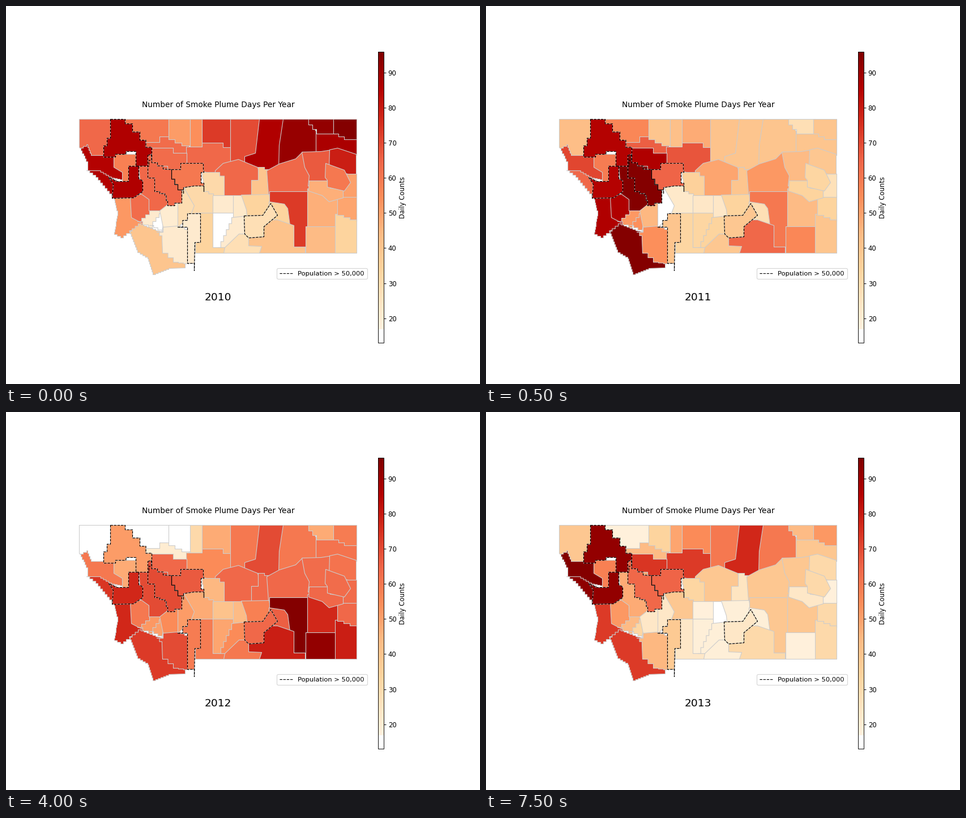
A matplotlib script for the animation above (8000 ms loop, 837 by 669 pixels).

```python
import numpy as np
import matplotlib.pyplot as plt
from matplotlib.animation import FuncAnimation
from matplotlib.cm import ScalarMappable
from matplotlib.colors import ListedColormap, Normalize
from matplotlib.lines import Line2D
from matplotlib.patches import Polygon

W, H, DPI = 837, 669, 83.7
FIRST_YEAR = 2010
STEP_MS, STEPS, STEPS_PER_YEAR = 500, 16, 7

plt.rcParams["font.family"] = "DejaVu Sans"

shades = plt.get_cmap("OrRd")(np.linspace(0, 1, 256))
shades[:12] = 1
cmap = ListedColormap(shades)
norm = Normalize(13, 96)

fig = plt.figure(figsize=((W + 0.01) / DPI, (H + 0.01) / DPI), dpi=DPI, facecolor="white")
ax = fig.add_axes([0, 0, 1, 1])
ax.set_xlim(-0.5, W - 0.5)
ax.set_ylim(H - 0.5, -0.5)
ax.axis("off")

counties = []


def stairs(a, b, step):
    """Points from a to b along steps; the path is the same in both directions."""
    if a[0] > b[0]:
        return stairs(b, a, step)[::-1]
    (x0, y0), (x1, y1) = a, b
    dx, dy = x1 - x0, y1 - y0
    if min(dx, abs(dy)) < 4:
        return [a, b]
    n = max(1, round(max(dx, abs(dy)) / step))
    path = [a]
    for k in range(n):
        x = x0 + dx * (k + 1) / n
        path += [(x, y0 + dy * k / n), (x, y0 + dy * (k + 1) / n)]
    return path


def county(days, *points, step=0, populous=False):
    """Add one county; later ones lie on top and define the shared border."""
    if step:
        ends = zip(points, points[1:] + points[:1])
        points = [p for a, b in ends for p in stairs(a, b, step)[:-1]]
    patch = Polygon(points, ec="0.8", lw=0.95, joinstyle="round",
                    zorder=2 + len(counties) * 0.01)
    ax.add_patch(patch)
    counties.append((patch, days))
    if populous:
        ax.add_patch(Polygon(points, fill=False, ec="black", lw=1, ls="--", zorder=5))


def box(days, left, top, right, bottom):
    county(days, (left, top), (right, top), (right, bottom), (left, bottom))


# North
county((64, 43, 13, 39), (129, 200), (190, 200), (190, 265), (150, 265), (129, 250))
box((60, 56, 13, 18), 205, 200, 288, 243)
county((63, 66, 21, 44), (238, 241), (270, 241), (270, 231), (322, 231), (322, 262),
       (238, 262))
county((51, 40, 13, 34), (286, 200), (324, 200), (324, 247), (309, 247), (286, 236),
       step=12)
box((54, 42, 31, 49), 324, 200, 349, 250)
box((73, 48, 48, 55), 345, 200, 398, 254)
county((64, 68, 55, 73), (318, 249), (346, 249), (346, 242), (383, 242), (383, 250),
       (399, 250), (399, 278), (372, 297), (330, 290), (319, 290))
county((63, 86, 64, 74), (243, 251), (287, 251), (294, 260), (318, 260), (318, 290),
       (252, 290), step=12)
box((70, 41, 60, 60), 395, 200, 451, 280)
county((86, 40, 70, 77), (447, 200), (493, 200), (485, 285), (460, 292), (421, 278),
       (421, 266), (440, 260))
county((91, 40, 60, 60), (489, 200), (537, 200), (550, 228), (550, 262), (515, 275),
       (481, 285), (482, 246))
box((87, 40, 61, 39), 546, 222, 618, 264)
county((92, 28, 48, 44), (533, 200), (581, 200), (581, 226), (547, 226), (533, 210),
       step=8)
county((95, 40, 59, 52), (577, 200), (618, 200), (618, 236), (596, 236), (577, 226),
       step=10)

# Centre
box((31, 23, 48, 39), 314, 316, 368, 370)
county((64, 49, 64, 39), (369, 291), (383, 278), (410, 271), (444, 285), (448, 300),
       (436, 340), (369, 340))
county((31, 35, 45, 33), (345, 294), (369, 294), (385, 307), (385, 338), (366, 336),
       (349, 328), step=10)
county((40, 40, 64, 25), (444, 285), (466, 292), (466, 337), (432, 337), (432, 308),
       (444, 302), step=12)
county((64, 52, 64, 39), (460, 291), (482, 279), (511, 270), (522, 259), (535, 264),
       (540, 333), (463, 333))
box((22, 24, 41, 18), 364, 335, 404, 370)
box((34, 33, 59, 24), 333, 366, 388, 437)
box((14, 33, 49, 19), 364, 366, 404, 427)
box((23, 24, 44, 14), 400, 335, 430, 374)
county((34, 34, 58, 19), (415, 334), (464, 333), (472, 375), (425, 371), (424, 360))
county((22, 34, 55, 19), (398, 374), (424, 371), (426, 406), (390, 427), (374, 427),
       step=10)
county((28, 39, 60, 19), (384, 437), (386, 427), (411, 403), (432, 403), (455, 428),
       (452, 437))

# East
box((73, 60, 95, 39), 464, 328, 538, 426)
county((34, 28, 66, 19), (464, 346), (491, 350), (497, 358), (501, 388), (464, 388))
county((41, 64, 79, 31), (428, 408), (445, 378), (479, 378), (508, 388), (508, 426),
       (528, 426), (528, 437), (447, 437), (451, 425), (428, 424))
box((47, 44, 77, 39), 531, 323, 590, 395)
box((44, 56, 92, 18), 528, 390, 584, 437)
box((34, 40, 79, 31), 580, 368, 618, 437)
county((49, 34, 64, 31), (584, 335), (618, 335), (618, 381), (584, 370), step=10)
county((67, 44, 63, 39), (522, 258), (556, 257), (575, 254), (575, 315), (533, 318),
       (535, 300), (527, 285))
county((79, 39, 61, 31), (571, 254), (585, 251), (618, 262), (618, 300), (570, 290))
box((50, 27, 63, 18), 593, 297, 618, 338)
county((47, 34, 64, 24), (535, 309), (572, 309), (572, 322), (595, 324), (595, 339),
       (570, 346), (558, 335), (534, 327))
county((60, 33, 63, 31), (564, 278), (597, 290), (608, 312), (597, 327), (567, 320),
       (567, 308), (563, 303))

# South-west
county((52, 86, 77, 73), (189, 338), (228, 338), (228, 372), (240, 385), (217, 397),
       (201, 410), (190, 404), (196, 366), step=5)
county((63, 86, 60, 52), (219, 338), (245, 330), (256, 340), (256, 366), (240, 384),
       (221, 374))
county((64, 95, 70, 48), (234, 283), (285, 283), (285, 353), (272, 362), (252, 362),
       (252, 342), (238, 332))
county((22, 52, 52, 44), (231, 381), (252, 362), (272, 362), (264, 385), (250, 392),
       step=8)
county((14, 54, 50, 33), (270, 367), (278, 380), (275, 400), (253, 388), step=8)
county((21, 45, 55, 24), (271, 362), (285, 351), (307, 345), (307, 392), (277, 391))
county((40, 95, 73, 73), (217, 398), (233, 385), (264, 397), (280, 400), (300, 448),
       (316, 455), (316, 463), (287, 464), (259, 475), (250, 447), (232, 436), step=5)
county((22, 54, 70, 45), (266, 400), (277, 391), (301, 389), (322, 398), (322, 457),
       (295, 453), (276, 437), (275, 412), step=8)
county((29, 14, 51, 24), (303, 345), (313, 320), (332, 353), (325, 372), (303, 391))

# North-west
county((85, 71, 60, 95), (129, 251), (141, 245), (149, 264), (195, 264), (210, 308),
       (180, 303), (143, 291), (143, 279), step=5)
county((85, 64, 74, 93), (142, 291), (162, 291), (195, 310), (192, 337), (186, 337),
       (158, 303), step=5)
county((58, 59, 48, 58), (190, 262), (232, 262), (232, 287), (220, 312), (205, 311),
       (205, 294), (190, 285))

# Populous
county((86, 85, 77, 92), (216, 283), (234, 283), (234, 305), (241, 309), (241, 328),
       (225, 339), (187, 340), (189, 315), (181, 303), (195, 310), (216, 310),
       populous=True)
county((86, 85, 51, 92), (184, 200), (210, 200), (210, 208), (236, 237), (257, 262),
       (247, 283), (229, 283), (229, 272), (220, 257), (212, 257), (211, 262),
       (193, 262), (193, 267), (172, 267), (172, 247), (184, 220), step=12, populous=True)
county((64, 95, 70, 64), (250, 264), (256, 262), (257, 277), (277, 288), (292, 289),
       (292, 306), (303, 325), (310, 329), (310, 344), (285, 353), (280, 335),
       (262, 328), (262, 309), (250, 304), step=12, populous=True)
county((60, 65, 67, 65), (292, 289), (308, 289), (308, 278), (335, 278), (348, 288),
       (349, 294), (344, 294), (344, 313), (349, 318), (349, 328), (332, 318),
       (313, 321), (313, 332), (303, 325), (292, 306), step=12, populous=True)
county((22, 40, 59, 38), (303, 391), (320, 367), (343, 367), (343, 401), (333, 418),
       (332, 468), (320, 455), (320, 402), step=12, populous=True)
county((28, 39, 64, 24), (420, 371), (453, 370), (467, 349), (479, 370), (455, 390),
       (455, 408), (428, 410), (421, 403), populous=True)

ax.text(374, 178.5, "Number of Smoke Plume Days Per Year", fontsize=11.9, ha="center")
year_text = ax.text(374, 520, "", fontsize=16, ha="center")

dashed = Line2D([], [], color="black", lw=1, ls="--", label="Population > 50,000")
ax.legend(handles=[dashed], fontsize=9.95, loc="lower right", borderaxespad=0,
          bbox_to_anchor=(637, 483), bbox_transform=ax.transData)

cax = fig.add_axes([656.5 / W, (H - 596) / H, 10 / W, 515 / H])
bar = fig.colorbar(ScalarMappable(norm, cmap), cax=cax, ticks=range(20, 91, 10))
bar.set_label("Daily Counts", fontsize=10)
bar.ax.tick_params(labelsize=10)


def update(step):
    i = (step + STEPS_PER_YEAR - 1) // STEPS_PER_YEAR
    for patch, days in counties:
        patch.set_facecolor(cmap(norm(days[i])))
    year_text.set_text(str(FIRST_YEAR + i))
    return [patch for patch, _ in counties] + [year_text]


anim = FuncAnimation(fig, update, frames=STEPS, interval=STEP_MS, repeat=True,
                     repeat_delay=0, init_func=lambda: update(0))
plt.show()
```
